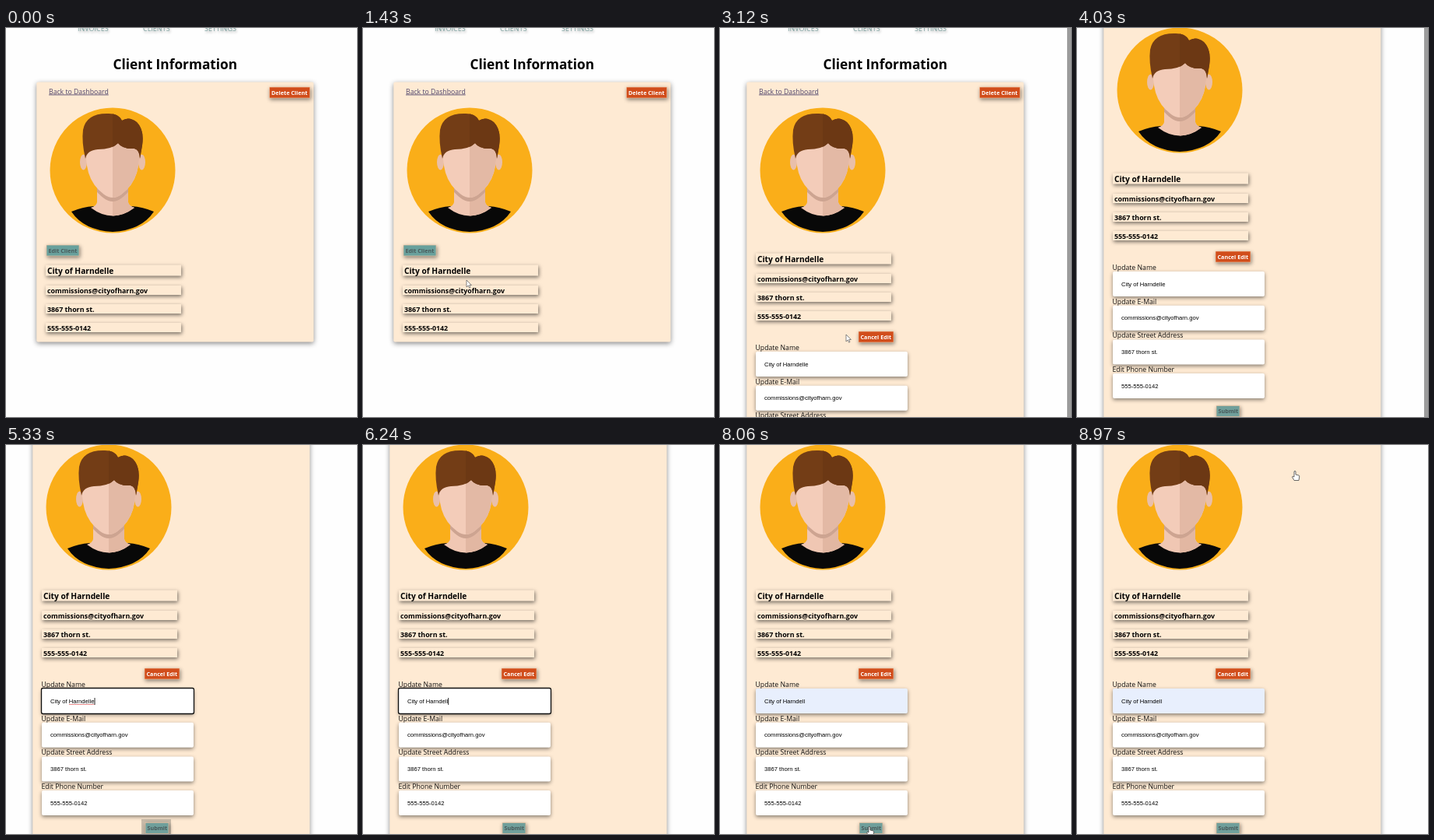
Recreate the animation shown at these times as an HTML page. Size 451 by 500 pixels, loop 9.1 s.

```html
<!DOCTYPE html>
<html lang="en">
<head>
<meta charset="utf-8">
<title>Client Information</title>
<style>
html, body { margin: 0; width: 100%; height: 100%; overflow: hidden; background: #fefefe; }
svg { display: block; width: 451px; height: 500px; font: 8.7px "Open Sans", "Noto Sans", sans-serif; }
.bold { font-weight: 700; }
.nav { font-size: 9px; fill: #7a9f9d; filter: drop-shadow(1px 2px 1.5px #0005); }
.card { fill: #feead3; filter: drop-shadow(0 2px 3px #0007); }
.row { fill: #feead3; filter: drop-shadow(1px 2px 2.5px #0008); }
.button { filter: drop-shadow(1px 2px 2.5px #0007); }
.button rect { stroke: #f6c9a6; stroke-width: .6; }
.button text { font-size: 7.2px; font-weight: 700; }
.field { fill: #fff; filter: drop-shadow(0 2px 2.5px #0007); }
.value { font: 7.65px "Liberation Sans", Arial, sans-serif; fill: #000; }
</style>
</head>
<body>
<svg viewBox="0 0 451 500">
  <g id="page"></g>
  <rect id="bar" x="446" width="5" height="500" fill="#9c9c9c"/>
  <path id="arrow" d="M0 0V9L2.2 7 3.6 10.2 5 9.6 3.7 6.5H6.4Z" fill="#fff" stroke="#555" stroke-width=".7"/>
  <path id="hand" d="M-1 1Q0-.5 1 1V5L5 6Q6 6.3 5.7 8L5 12.5H-1L-3.6 8Q-3.5 6.5-1 8Z" fill="#fff" stroke="#444" stroke-width=".8"/>
</svg>
<script>
const LOOP = 9100, STEP = 130;
const EDIT = 2470, RELEASE = 4680, FOCUS = 4940, ERASE = 5720, AUTOFILL = 6370, BLUR = 7930;
const client = ["City of Harndelle", "commissions@cityofharn.gov", "3867 thorn st.", "555-555-0142"];
const labels = ["Update Name", "Update E-Mail", "Update Street Address", "Edit Phone Number"];
const $ = id => document.getElementById(id);

const text = (x, y, str, attrs = "") => `<text x="${x}" y="${y}" ${attrs}>${str}</text>`;
const rect = (x, y, w, h, attrs) => `<rect x="${x}" y="${y}" width="${w}" height="${h}" ${attrs}/>`;
const button = (id, x, y, w, label, fill, ink) =>
  `<g id="${id}" class="button">${rect(x, y, w, 14, `fill="${fill}"`)}${text(x + 2.5, y + 9.8, label, `fill="${ink}"`)}</g>`;

const face = "M103 145Q101 168 106 186Q111 203 126 214Q137 222 148 214Q163 203 168 186Q173 168 171 145Z";
const neck = "M117 200V224Q116 229 109 231Q137 252 165 231Q158 229 157 224V200Z";
const hair = "M102 168Q97 146 99 131Q103 109 132 110Q145 110 149 119Q158 113 168 121Q178 131 175 151L172 168" +
  "Q172 157 165 155Q150 156 144 148Q136 156 118 156Q104 157 102 168Z";

// The right half of each figure part is darker; hair goes over the shaded skin.
const avatar = `
  <clipPath id="right"><path d="M137 100H200V270H137Z"/></clipPath>
  <clipPath id="neck"><path d="${neck}"/></clipPath>
  <circle cx="137" cy="183" r="80.5" fill="#faae19"/>
  <g fill="#e9bfaa"><ellipse cx="99.5" cy="172.5" rx="4.5" ry="10"/><ellipse cx="174.5" cy="172.5" rx="4.5" ry="10"/></g>
  <path d="M84 236Q98 230 113 229Q137 246 161 229Q176 230 190 236Q174 260 137 262Q100 260 84 236Z" fill="#080808"/>
  <path d="${neck}" fill="#f0c7b3"/>
  <path d="${neck}" fill="#e2b7a2" clip-path="url(#right)"/>
  <path d="${face}" fill="#cda491" transform="translate(0 5)" clip-path="url(#neck)"/>
  <path d="${face}" fill="#f3ccb9"/>
  <path d="${face}" fill="#e3b9a5" clip-path="url(#right)"/>
  <path d="${hair}" fill="#733d16"/>
  <path d="${hair}" fill="#6c3814" clip-path="url(#right)"/>`;

const rows = client.map((str, i) => {
  const y = i ? 307 + 24 * i : 304.5;
  return rect(51, y, 174, i ? 12 : 14, 'class="row"') +
    text(53, i ? y + 9.8 : 316, str, `class="bold" font-size="${i ? 8.85 : 10.2}"`);
}).join("");

const form = labels.map((label, i) => {
  const y = 416 + 43.7 * i;
  return text(50.5, y - 2.2, label, 'fill="#111"') +
    rect(51, y, 195, 32, `id="field${i}" class="field" rx="2"`) +
    text(62, y + 18.7, client[i], `id="value${i}" class="value"`);
}).join("");

$("page").innerHTML =
  text(92, 4, "INVOICES", 'class="nav"') + text(176, 4, "CLIENTS", 'class="nav"') +
  text(255, 4, "SETTINGS", 'class="nav"') +
  text(137.5, 53, "Client Information", 'class="bold" font-size="17.3"') +
  rect(39.3, 69.5, 356, 334, 'id="card" class="card" rx="2"') +
  text(55, 84.5, "Back to Dashboard", 'fill="#50466c" text-decoration="underline"') +
  button("delete", 338.5, 76, 52, "Delete Client", "#d14d1b", "#fff") + avatar +
  button("edit", 52, 279, 42, "Edit Client", "#68a09c", "#49595a") +
  `<g id="rows">${rows}</g><g id="form">` +
  rect(179, 584, 38, 24, 'id="halo" fill="#8a8478" fill-opacity=".45"') +
  button("cancel", 183, 390, 45, "Cancel Edit", "#d14d1b", "#fff") + form +
  button("submit", 184, 588.5, 30, "Submit", "#6f9f9b", "#49595a") +
  rect(50.5, 415.5, 196, 33, 'id="ring" rx="2" fill="none" stroke="#111" stroke-width="1.3"') +
  '<path id="typo" d="M86 436.5H118.5" stroke="#d55" stroke-width=".9" stroke-dasharray="1.5 .5"/>' +
  '<path id="caret" d="M119 428V437" stroke="#111" stroke-width=".9"/></g>';

const arrowPath = [[780, 170, 60], [1430, 133, 324], [2080, 76, 286], [2470, 76, 286], [3120, 162, 394],
  [3380, 448, 400]];
const handPath = [[7670, 192, 590], [7800, 192, 490], [8320, 192, 490], [8970, 280, 33]];

const ramp = (t, a, b) => {
  const p = Math.min(1, Math.max(0, (t - a) / (b - a)));
  return p * p * (3 - 2 * p);
};
const show = (id, on) => $(id).setAttribute("visibility", on ? "visible" : "hidden");
const move = (id, x, y) => $(id).setAttribute("transform", `translate(${x} ${y})`);

function point(id, path, t) {
  const next = path.findIndex(k => k[0] > t);
  const last = path[path.length - 1];
  const active = next > 0 || t === last[0];
  show(id, active);
  if (!active) return;
  const b = next > 0 ? path[next] : last;
  const a = next > 0 ? path[next - 1] : path[path.length - 2];
  const p = ramp(t, a[0], b[0]);
  move(id, a[1] + (b[1] - a[1]) * p, a[2] + (b[2] - a[2]) * p);
}

function draw(now) {
  const t = Math.floor(now % LOOP / STEP) * STEP;
  const editing = t >= EDIT, focused = t >= FOCUS && t < BLUR;
  move("page", editing ? -5 : 0, -103 * ramp(t, 3380, 3900));
  move("rows", 0, editing ? -15 : 0);
  $("card").setAttribute("height", editing ? 560 : 334);
  $("edit").style.display = editing ? "none" : "";
  $("form").style.display = editing ? "" : "none";
  show("bar", editing && t < RELEASE);
  show("halo", t >= FOCUS && t < ERASE);
  show("ring", focused);
  show("typo", t >= FOCUS && t < ERASE);
  show("caret", focused && t < AUTOFILL && (t - FOCUS) % 1040 < 520);
  move("caret", t < ERASE ? 0 : -4.3, 0);
  $("value0").textContent = t < ERASE ? client[0] : client[0].slice(0, -1);
  $("field0").style.fill = t < AUTOFILL ? "#fff" : "#e8effd";
  point("arrow", arrowPath, t);
  point("hand", handPath, t);
}

const start = performance.now();
function tick() {
  draw(performance.now() - start);
  requestAnimationFrame(tick);
}
tick();
</script>
</body>
</html>
```
